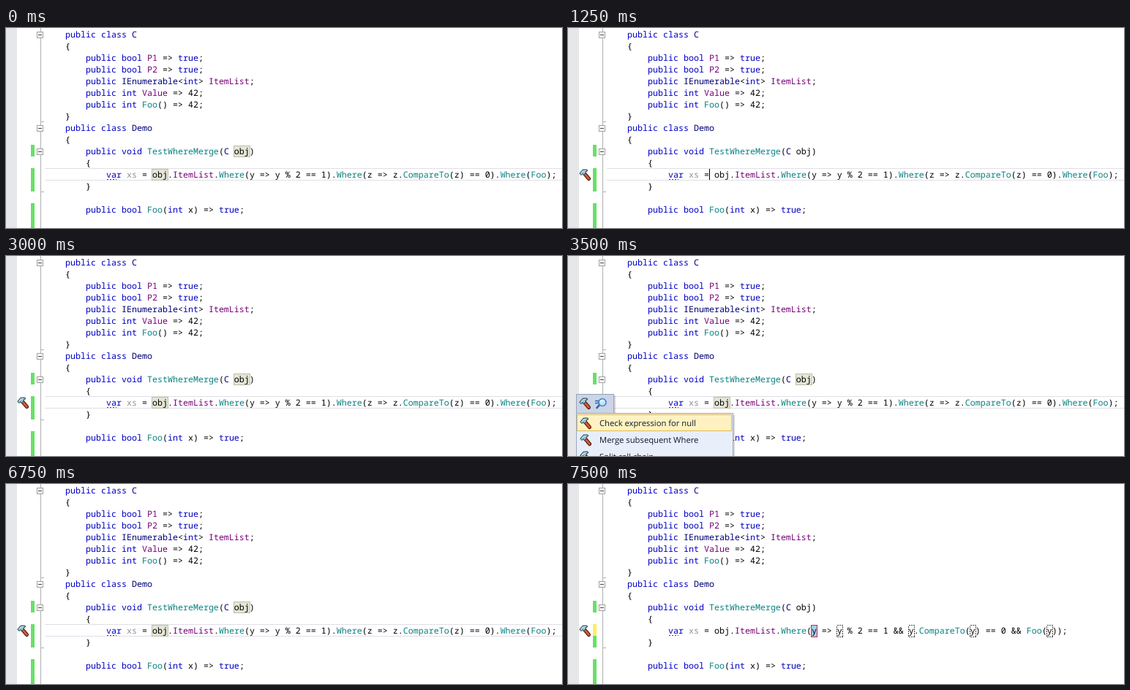
An HTML page for the animation above (8000 ms loop, 760 by 274 pixels).

```html
<!DOCTYPE html>
<html lang="en">
<head>
<meta charset="utf-8">
<title>Code editor quick action</title>
<style>
  html, body { margin: 0; width: 100%; height: 100%; overflow: hidden; background: #fff; }
  svg { display: block; width: 760px; height: 274px; }
  text { white-space: pre; text-rendering: geometricPrecision; }
  .code { font: 11.667px "Noto Sans Mono", "DejaVu Sans Mono", monospace; fill: #000; }
  .keyword { fill: #0000c4; }
  .type { fill: #000078; }
  .member { fill: #780078; }
  .method { fill: #0a8080; }
  .unused { fill: #909090; }
  .item { font: 11.25px "Open Sans", "Noto Sans", sans-serif; fill: #10182e; }
  rect, path { shape-rendering: crispEdges; }
  .icon path, .icon circle { shape-rendering: auto; }
</style>
</head>
<body>
<svg viewBox="0 0 760 274" xmlns="http://www.w3.org/2000/svg">
  <defs>
    <g id="hammer" class="icon">
      <path d="M7.5 6.5 L13.5 13.5" stroke="#4a1710" stroke-width="5" stroke-linecap="round"/>
      <path d="M7.5 6.5 L13.5 13.5" stroke="#dd5a2c" stroke-width="2.8" stroke-linecap="round"/>
      <path d="M.8 6.2 L5 1.2 L10.6 1 L12 2.4 L9 4 L9.4 5.6 L6.4 8.6 L4.8 6.6 L3 8.6 Z"
            fill="#8fc0d2" stroke="#173440"/>
      <path d="M3.2 5.6 L6 2.8 L9 2.4" fill="none" stroke="#e2f5fa"/>
    </g>
    <g id="lens" class="icon">
      <path d="M6 10 L2.5 14" stroke="#2f5f9c" stroke-width="2.6" stroke-linecap="round"/>
      <path d="M0 4.5 H5 M0 7.5 H5" stroke="#2c69ab" stroke-width="1.4"/>
      <circle cx="10" cy="6.5" r="5" fill="#c4e4fa" stroke="#3b83c4" stroke-width="1.6"/>
      <path d="M7.2 5.5 Q9 3.2 12 4.2" fill="none" stroke="#fff" stroke-width="1.4"/>
    </g>
  </defs>

  <rect width="15" height="274" fill="#e6e7e8"/>
  <g id="marks"></g>
  <rect id="edited" x="34" y="192" width="5" height="16" fill="#ffee62"/>
  <path id="line" d="M53 192.5 H760 M53 208.5 H760" stroke="#dedee6"/>
  <g id="refs" fill="#e5e6d6" stroke="#bdbea9">
    <rect x="311.5" y="161.5" width="22" height="15"/>
    <rect x="199.5" y="193.5" width="22" height="15"/>
  </g>
  <g id="fields"></g>
  <g id="code"></g>
  <path d="M138 207.5 H151" stroke="#3a3ac8" stroke-dasharray="2 2"/>
  <rect id="caret" y="193" width="1" height="15"/>
  <use id="bulb" href="#hammer" x="15" y="193"/>

  <g id="menu">
    <path d="M14 191 H65 V218 H228 V274 H14 Z" fill="#000" opacity=".16"/>
    <rect x="11.5" y="189.5" width="51" height="26" fill="#cbd5e8" stroke="#97a2b8"/>
    <use href="#hammer" x="15" y="194"/>
    <use href="#lens" x="37" y="194"/>
    <rect x="11.5" y="215.5" width="214" height="70" fill="#e9eefb" stroke="#9ba7b7"/>
    <rect id="pick" x="12.5" width="211" height="22" fill="#fff2c0" stroke="#e0bb58"/>
    <g id="items"></g>
  </g>
</svg>
<script>
const $ = id => document.getElementById(id);
const COL = 7, ROW = 16, LOOP = 8000;

const before = "var xs = obj.ItemList.Where(y => y % 2 == 1).Where(z => z.CompareTo(z) == 0).Where(Foo);";
const after = "var xs = obj.ItemList.Where(y => y % 2 == 1 && y.CompareTo(y) == 0 && Foo(y));";

// [row, indent, text, id]
const lines = [
  [0, 0, "public class C"], [1, 0, "{"],
  [2, 1, "public bool P1 => true;"],
  [3, 1, "public bool P2 => true;"],
  [4, 1, "public IEnumerable<int> ItemList;"],
  [5, 1, "public int Value => 42;"],
  [6, 1, "public int Foo() => 42;"], [7, 0, "}"],
  [8, 0, "public class Demo"], [9, 0, "{"],
  [10, 1, "public void TestWhereMerge(C obj)"], [11, 1, "{"],
  [12, 2, before, "before"], [12, 2, after, "after"], [13, 1, "}"],
  [15, 1, "public bool Foo(int x) => true;"]
];

const kinds = {
  keyword: "public class bool int void var true",
  type: "C Demo IEnumerable",
  member: "P1 P2 ItemList Value",
  method: "Foo TestWhereMerge Where CompareTo",
  unused: "xs"
};
const kindOf = {};
for (const [kind, words] of Object.entries(kinds))
  for (const word of words.split(" ")) kindOf[word] = kind;

const escape = s => s.replace(/&/g, "&amp;").replace(/</g, "&lt;");
const paint = text => text.split(/(\w+)/).map(part =>
  kindOf[part] ? `<tspan class="${kindOf[part]}">${part}</tspan>` : escape(part)).join("");

$("code").innerHTML = lines.map(([row, indent, text, id = ""]) =>
  `<text class="code"${id && ` id="${id}"`} x="${81 + indent * 4 * COL}" y="${13 + row * ROW}">${paint(text)}</text>`
).join("");

// change bars and outline margin
const bar = (y, h) => `<rect x="34" y="${y}" width="5" height="${h}" fill="#68e068"/>`;
const fold = y => `<rect x="42.5" y="${y - 4.5}" width="8" height="8" fill="#fff" stroke="#a0a0a0"/>
  <path d="M44 ${y - .5} H49" stroke="#444"/>`;
$("marks").innerHTML = bar(160, 16) + bar(192, 32) + bar(240, 34) +
  `<path d="M47.5 0 V274 M47 128.5 H52 M47 224.5 H52" stroke="#b0b0b0"/>` +
  [10, 138, 170].map(fold).join("");

// linked rename fields on every y of the merged line
$("fields").innerHTML = [...after.matchAll(/\by\b/g)].map((m, i) => {
  const x = 137 + m.index * COL;
  const look = i ? 'fill="#fff" stroke="#444" stroke-dasharray="2 1"' : 'fill="#a5cdf2" stroke="#d02a35"';
  return `<rect x="${x - .5}" y="193.5" width="8" height="16" ${look}/>`;
}).join("");

$("items").innerHTML = ["Check expression for null", "Merge subsequent Where", "Split call chain"]
  .map((label, i) => `<use href="#hammer" x="16" y="${221 + i * 23}"/>
    <text class="item" x="43" y="${233 + i * 23}">${label}</text>`).join("");

// each step changes only the listed parts
const steps = [
  [0, { caret: 0, refs: 1, bulb: 0, pick: -1, merged: 0, fields: 0 }],
  [500, { caret: 200 }],
  [750, { caret: 193 }],
  [1000, { refs: 0 }],
  [1250, { bulb: 1 }],
  [1500, { caret: 0 }],
  [2000, { caret: 193 }],
  [2500, { caret: 200 }],
  [2750, { refs: 1 }],
  [3000, { caret: 0 }],
  [3500, { pick: 0 }],
  [5000, { pick: 1 }],
  [6750, { pick: -1 }],
  [7000, { merged: 1, refs: 0 }],
  [7250, { fields: 1 }]
];

const show = (id, on) => { $(id).style.display = on ? "" : "none"; };

function draw(t) {
  const s = Object.assign({}, ...steps.filter(([at]) => at <= t).map(([, part]) => part));
  show("caret", s.caret);
  $("caret").setAttribute("x", s.caret);
  show("refs", s.refs);
  show("bulb", s.bulb && s.pick < 0);
  show("menu", s.pick >= 0);
  $("pick").setAttribute("y", 217.5 + Math.max(0, s.pick) * 23);
  show("before", !s.merged);
  show("line", !s.merged);
  show("after", s.merged);
  show("edited", s.merged);
  show("fields", s.fields);
}

const start = performance.now();
function tick() {
  draw((performance.now() - start) % LOOP);
  requestAnimationFrame(tick);
}
tick();
</script>
</body>
</html>
```
